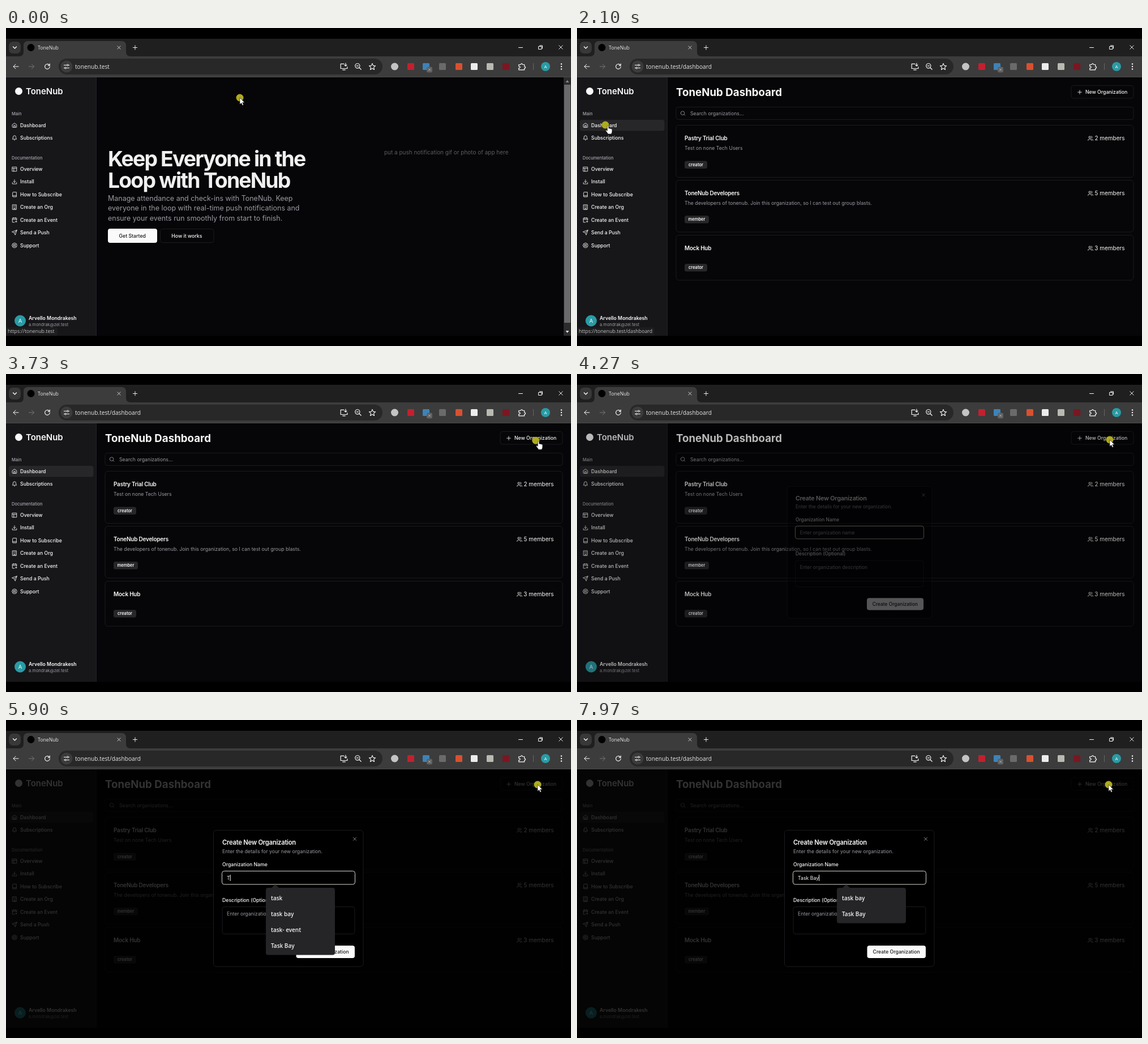
These frames come from a looping animation (998x561 px, 8 s). An HTML page:

```html
<!DOCTYPE html>
<html lang="en">
<head>
<meta charset="utf-8">
<title>Organization dashboard</title>
<style>
html, body { margin: 0; width: 100%; height: 100%; overflow: hidden; background: #000; }
svg { display: block; width: 100vw; height: 100vh; }
text { font-family: Inter, Roboto, sans-serif; white-space: pre; }
.ui text { font-family: "Open Sans", "Noto Sans", sans-serif; }
</style>
</head>
<body>
<svg id="stage" viewBox="0 0 998 561" xmlns="http://www.w3.org/2000/svg"></svg>
<script>
const WHITE = '#fafafa', GREY = '#9a9aa2', LINE = '#1b1b20', PAGE = '#060608', BAR = '#3c3c3c', TEAL = '#2a9ba5';
const BRAND = 'ToneNub', HOST = 'tonenub.test';
// page text sizes
const XS = 7.48, SM = 8.73, MD = 9.98, LG = 11.23, XL = 12.47;

// y is the middle of the capitals
const text = (x, y, size, weight, fill, str, extra = '') =>
  `<text x="${x}" y="${(y + size * .36).toFixed(2)}" font-size="${size}" font-weight="${weight}" fill="${fill}" ${extra}>${str}</text>`;
const rect = (x, y, x2, y2, r, fill, stroke = 'none') =>
  `<rect x="${x}" y="${y}" width="${x2 - x}" height="${y2 - y}" rx="${r}" fill="${fill}" stroke="${stroke}"/>`;
const dot = (x, y, r, fill) => `<circle cx="${x}" cy="${y}" r="${r}" fill="${fill}"/>`;
const line = (d, color, w = 1.2) =>
  `<path d="${d}" fill="none" stroke="${color}" stroke-width="${w}" stroke-linecap="round" stroke-linejoin="round"/>`;
// icons are drawn on a 24 unit grid
const icon = (name, x, y, color = WHITE, size = 10) =>
  `<g transform="translate(${x - size / 2} ${y - size / 2}) scale(${size / 24})">${line(ICONS[name], color, 2)}</g>`;
const group = (id, body, extra = '') => `<g id="${id}" ${extra}>${body}</g>`;
const MIDDLE = 'text-anchor="middle"', TIGHT = 'letter-spacing="-.022em"';

const ICONS = {
  home: 'M3 9.5 12 3l9 6.5V20a1 1 0 0 1-1 1H4a1 1 0 0 1-1-1zM9 21v-8h6v8',
  bell: 'M6 8a6 6 0 0 1 12 0c0 7 3 9 3 9H3s3-2 3-9M10.3 21a2 2 0 0 0 3.4 0',
  layout: 'M3 3h18v18H3zM3 9h18M9 21V9',
  install: 'M21 15v6H3v-6M7 10l5 5 5-5M12 15V3',
  book: 'M4 19.5v-15A2.5 2.5 0 0 1 6.5 2H20v20H6.5a2.5 2.5 0 0 1 0-5H20',
  building: 'M4 2h16v20H4zM9 22v-4h6v4M8 6h.1M12 6h.1M16 6h.1M8 10h.1M12 10h.1M16 10h.1M8 14h.1M12 14h.1M16 14h.1',
  event: 'M21 13V4H3v18h9M16 2v4M8 2v4M3 10h18M16 19h6M19 16v6',
  send: 'M22 2 15 22l-4-9-9-4zM22 2 11 13',
  help: 'M2 12a10 10 0 1 0 20 0a10 10 0 1 0-20 0M8 12a4 4 0 1 0 8 0a4 4 0 1 0-8 0M5 5l4.2 4.2M14.8 9.2 19 5M14.8 14.8l4.2 4.2M9.2 14.8 5 19',
  users: 'M16 21v-2a4 4 0 0 0-4-4H6a4 4 0 0 0-4 4v2M5 7a4 4 0 1 0 8 0a4 4 0 1 0-8 0M22 21v-2a4 4 0 0 0-3-3.9M16 3.1a4 4 0 0 1 0 7.8',
  search: 'M3 11a8 8 0 1 0 16 0a8 8 0 1 0-16 0M21 21l-4.3-4.3',
  zoomOut: 'M3 10a7 7 0 1 0 14 0a7 7 0 1 0-14 0M21 21l-6-6M7 10h6',
  plus: 'M4 12h16M12 4v16',
  cross: 'M5 5l14 14M19 5 5 19',
  back: 'M21 12H3M11 4l-8 8 8 8',
  forward: 'M3 12h18M13 4l8 8-8 8',
  reload: 'M20 12a8 8 0 1 1-2.4-5.7L20 8.5M20 3v5.5h-5.5',
  tune: 'M3 7h8M19 7h2M13 7a2.8 2.8 0 1 0 5.6 0a2.8 2.8 0 1 0-5.6 0M3 17h2M13 17h8M5.4 17a2.8 2.8 0 1 0 5.6 0a2.8 2.8 0 1 0-5.6 0',
  screen: 'M12 4H2v14h20v-5M8 22h8M17 2v8M13.5 7l3.5 3.5L20.5 7',
  star: 'M12 2l3 7 7.5.6-5.7 5 1.7 7.4-6.5-4-6.5 4 1.7-7.4-5.7-5 7.5-.6z',
  puzzle: 'M3 6h6a2.8 2.8 0 1 1 5.6 0H20v6a2.6 2.6 0 1 1 0 5v5H3v-5.5a2.8 2.8 0 1 0 0-5z'
};

function browser() {
  const tiles = [[715, '#c3202f'], [742, '#3d83b8'], [771, '#6a6a6a'], [800, '#d9502f'],
    [827, '#ececec'], [855, '#b9b9b1'], [883, '#7c1620']];
  return rect(0, 19, 998, 51, 0, '#1f1f1f') + rect(0, 50, 998, 87, 0, BAR) +
    `<path d="M23 50q8 0 8-8V31q0-8 8-8h165q8 0 8 8v11q0 8 8 8z" fill="${BAR}"/>` +
    rect(5, 24, 26, 45, 7, '#383838') + line('M12.5 33l3 3 3-3', WHITE, 1.4) +
    dot(44, 34.5, 6.5, '#000') + text(56, 35, 8.7, 400, '#e8e8e8', BRAND) +
    icon('cross', 199.5, 34.5, WHITE, 9) + icon('plus', 228, 34.5, WHITE, 11) +
    line('M905.5 34.5h7M941 32.5h5v5h-5zM942.5 31h5v5', WHITE, 1) + icon('cross', 980, 34, WHITE, 11) +
    icon('back', 17.5, 68, WHITE, 12) + icon('forward', 45, 68, '#777', 12) + icon('reload', 73, 68, WHITE, 13) +
    rect(93, 54, 665, 82, 14, '#282828') + dot(107, 68, 10.5, BAR) + icon('tune', 107, 68, WHITE, 12) +
    text(122, 68.5, 10.2, 400, '#e6e6e6', '', 'id="url"') +
    icon('screen', 597, 68, WHITE, 14) + icon('zoomOut', 622, 68, WHITE, 14) + icon('star', 647, 68, WHITE, 13) +
    dot(686.5, 68, 6.5, '#c4c4c4') + tiles.map(([x, c]) => rect(x - 6, 62, x + 6, 74, 1.5, c)).join('') +
    rect(743, 68.5, 753, 78.5, 2.5, '#606060') + icon('cross', 748, 73.5, WHITE, 6) +
    icon('puzzle', 911, 68, WHITE, 14) + rect(931, 62, 932, 74, 0, '#666') +
    dot(953, 68, 8, TEAL) + text(953, 68, 8, 400, WHITE, 'A', MIDDLE) +
    [63.5, 68, 72.5].map(y => dot(981, y, 1.2, WHITE)).join('') + rect(0, 86, 998, 87, 0, '#4a4a4a');
}

function sidebar() {
  const items = [['home', 'Dashboard', 171.5], ['bell', 'Subscriptions', 194], ['layout', 'Overview', 249],
    ['install', 'Install', 271.3], ['book', 'How to Subscribe', 293.7], ['building', 'Create an Org', 316],
    ['event', 'Create an Event', 338.6], ['send', 'Send a Push', 361], ['help', 'Support', 383.5]];
  return rect(0, 87, 159, 543, 0, '#17171a') + rect(159, 87, 160, 543, 0, '#232328') +
    group('active', rect(5, 162, 154.5, 181.5, 4, '#27272a')) +
    dot(22.5, 111.5, 6.5, WHITE) + text(35, 111.8, 14.97, 600, WHITE, BRAND) +
    text(10, 151.8, XS, 500, '#a8a8ae', 'Main') + text(10, 229, XS, 500, '#a8a8ae', 'Documentation') +
    items.map(([i, s, y]) => icon(i, 15, y) + text(25, y, SM, 500, WHITE, s)).join('') +
    dot(25, 516.5, 10, TEAL) + text(25, 517, 9.5, 400, WHITE, 'A', MIDDLE) +
    text(40, 511.7, SM, 600, WHITE, 'Arvello Mondrakesh') + text(40, 523.3, XS, 400, GREY, 'a.mondrak@zel.test');
}

function home() {
  const big = 'letter-spacing="-.05em"';
  const copy = [`Manage attendance and check-ins with ${BRAND}. Keep`,
    'everyone in the loop with real-time push notifications and',
    'ensure your events run smoothly from start to finish.'];
  return text(180, 231, 37.42, 700, '#f0f0f0', 'Keep Everyone in the', big) +
    text(180, 268.3, 37.42, 700, '#f0f0f0', `Loop with ${BRAND}`, big) +
    copy.map((s, i) => text(180, 300.5 + 17.4 * i, XL, 400, GREY, s)).join('') +
    text(668, 219, MD, 400, '#5c5c62', 'put a push notification gif or photo of app here') +
    rect(180, 354, 267, 379, 4, WHITE) + text(199.5, 366.5, SM, 500, '#18181b', 'Get Started') +
    rect(272.5, 354.5, 367, 378.5, 4, PAGE, LINE) + text(292.3, 366.5, SM, 500, WHITE, 'How it works') +
    rect(985, 87, 998, 543, 0, '#2c2c2c') + rect(986, 100, 997, 520, 0, '#6a6a6a') +
    '<path d="M988.5 96l3-4 3 4z" fill="#8a8a8a"/><path d="M988.5 534l3 4 3-4z" fill="#ddd"/>';
}

function dashboard() {
  const cards = [
    [171.5, 263.5, 'Pastry Trial Club', 'Test on none Tech Users', 'creator', 230, 2],
    [268.5, 360, BRAND + ' Developers', `The developers of ${BRAND.toLowerCase()}. Join this organization, so I can test out group blasts.`, 'member', 233, 5],
    [365.5, 445, 'Mock Hub', '', 'creator', 230, 3]];
  const card = ([top, bottom, name, about, role, edge, count]) =>
    rect(175, top, 983, bottom, 5, PAGE, LINE) +
    text(190, top + 23.3, MD, 600, WHITE, name, TIGHT) + text(190, top + 40.8, SM, 400, GREY, about) +
    rect(190, bottom - 29, edge, bottom - 15.5, 3.5, '#27272a') +
    text((190 + edge) / 2, bottom - 22.2, XS, 600, WHITE, role, MIDDLE) +
    icon('users', 907, top + 23.2) + text(967.5, top + 23.3, MD, 400, WHITE, count + ' members', 'text-anchor="end"');
  return text(175, 113, 18.71, 700, WHITE, BRAND + ' Dashboard') +
    rect(873, 101.5, 983, 124, 4, PAGE, LINE) + icon('plus', 888, 113.2) + text(898, 113, SM, 500, WHITE, 'New Organization') +
    rect(175, 139.5, 983, 161.5, 4, PAGE, LINE) + icon('search', 187, 150.5, GREY) +
    text(200, 150.5, SM, 400, GREY, 'Search organizations...') + cards.map(card).join('');
}

function dialog() {
  return rect(366.5, 194.5, 631, 435, 5, '#000', LINE) +
    text(382, 215.5, LG, 600, WHITE, 'Create New Organization', TIGHT) +
    text(382, 231.5, SM, 400, GREY, 'Enter the details for your new organization.') +
    icon('cross', 616, 209.8, '#b4b4b8', 9) +
    text(382, 255, SM, 500, WHITE, 'Organization Name') + rect(381.5, 266.5, 616.5, 290, 4, '#000', '#d6d6cf') +
    text(390, 278.7, SM, 400, GREY, 'Enter organization name', 'id="hint"') +
    text(390, 278.7, SM, 400, WHITE, '', 'id="typed"') +
    '<rect id="caret" y="273" width="1" height="11" fill="#fff"/>' +
    text(382, 317.5, SM, 500, WHITE, 'Description (Optional)') + rect(382, 329.5, 616, 377.5, 4, '#000', LINE) +
    text(390, 341.5, SM, 400, GREY, 'Enter organization description') +
    rect(512.5, 398, 616, 420, 4, WHITE) + text(522.5, 409, SM, 500, '#18181b', 'Create Organization');
}

const $ = id => document.getElementById(id);
const show = (id, on) => $(id).style.display = on ? '' : 'none';

$('stage').innerHTML =
  rect(0, 0, 998, 561, 0, '#000') + rect(0, 87, 998, 543, 0, PAGE) +
  group('home', home()) + group('dashboard', dashboard()) + sidebar() +
  group('shade', rect(0, 87, 998, 543, 0, 'rgba(0,0,0,.8)')) + group('dialog', dialog()) +
  group('popup', '', 'class="ui"') + group('browser', browser(), 'class="ui"') +
  group('status', '', 'class="ui"') +
  group('cursor', dot(0, 0, 6.5, '#aeaa1f') +
    '<g stroke="#111" stroke-width=".6" stroke-linejoin="round" fill="#fff">' +
    '<path id="arrow" d="M0 0V11.8L2.7 9.2 4.5 13.4 6.5 12.5 4.7 8.5H8.4Z"/>' +
    '<path id="hand" d="M3.5 2.2q1.2-1.5 2.4 0V6.2q1.3-.9 2.2.3 1.3-.7 2 .5 1.6-.6 1.9 1V11.5q0 2-1.5 4.5H4.8Q3.5 13.5 1 10.8q-.7-1.8 1-1.7l1.5 1.3Z"/></g>');

const PATH = [[0, 413, 123], [30, 413, 123], [830, 52, 172], [1330, 50, 171], [2770, 50, 171],
  [3570, 932, 118], [3930, 941, 116], [5270, 941, 116], [5430, 939, 114], [8000, 939, 114]];
const NAME = 'Task Bay', KEYS = [5770, 6030, 6230, 6370, 6770, 7000, 7270, 7570];
const GUESSES = ['task', 'task bay', 'task- event', NAME];
const ROUTE = 1770, OPEN = 4230;

function pointer(t) {
  const i = PATH.findIndex(p => p[0] > t), [t0, x0, y0] = PATH[i - 1], [t1, x1, y1] = PATH[i];
  const k = (t - t0) / (t1 - t0), e = k * k * (3 - 2 * k);
  return [x0 + (x1 - x0) * e, y0 + (y1 - y0) * e];
}

function drawPopup(entry) {
  const list = GUESSES.filter(g => g.toLowerCase().startsWith(entry.toLowerCase()));
  show('popup', entry);
  $('popup').innerHTML = rect(459, 296, 581, 302.5 + 28 * list.length, 4, '#252528') +
    '<path d="M468.5 296.5l7-6.5 7 6.5z" fill="#252528"/>' +
    list.map((s, i) => text(468, 314.3 + 28 * i, 10, 600, '#f2f2f2', s)).join('');
}

function drawStatus(link, width) {
  $('status').innerHTML = link &&
    rect(0, 528, width, 543, 2, '#1d1d1f') + text(3, 535, 8.8, 400, '#c2c2c2', 'https://' + link);
}

let lastEntry, lastLink;
function draw(now) {
  const t = now % 8000, routed = t >= ROUTE, count = KEYS.filter(k => k <= t).length;
  const [x, y] = pointer(t);
  const overNav = x < 154 && y > 162 && y < 182, overButton = x > 873 && y > 102 && y < 124 && t < OPEN;
  show('home', !routed);
  show('dashboard', routed);
  show('active', routed || overNav);
  $('url').textContent = HOST + (routed ? '/dashboard' : '');

  const link = t < 400 ? HOST : t >= 1000 && t < 3000 ? HOST + '/dashboard' : '';
  if (link !== lastLink) drawStatus(lastLink = link, t < 400 ? 91 : 137);

  const p = Math.min(1, Math.max(0, (t - OPEN) / 125)), s = .95 + .05 * p;
  $('shade').style.opacity = $('dialog').style.opacity = p;
  $('dialog').setAttribute('transform', `translate(499 315) scale(${s}) translate(-499 -315)`);

  const entry = NAME.slice(0, count);
  if (entry !== lastEntry) {
    $('typed').textContent = lastEntry = entry;
    drawPopup(entry);
  }
  show('hint', !count);
  const since = t - (count ? KEYS[count - 1] : OPEN + 70);
  $('caret').setAttribute('x', 390 + (count ? $('typed').getComputedTextLength() : 0));
  show('caret', since >= 0 && since % 1000 < 500);

  $('cursor').setAttribute('transform', `translate(${x} ${y})`);
  show('hand', overNav || overButton);
  show('arrow', !overNav && !overButton);
}

const start = performance.now();
function tick() {
  draw(performance.now() - start);
  requestAnimationFrame(tick);
}
tick();
</script>
</body>
</html>
```
